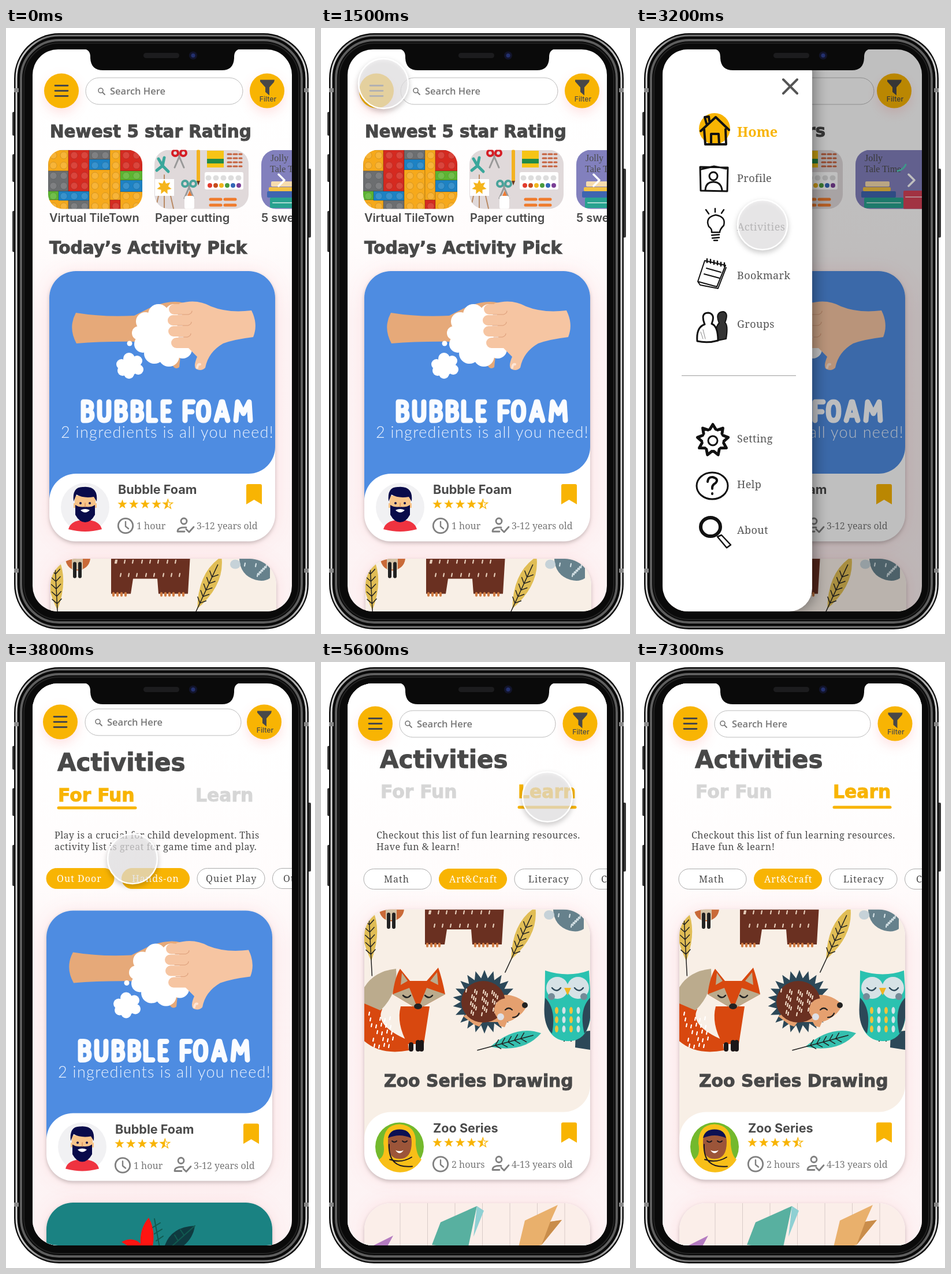
Write an HTML page that moves like this. It is 535 px wide and 1047 px high and loops after 7400 ms.

```html
<!DOCTYPE html>
<html lang="en">
<head>
<meta charset="utf-8">
<title>Activity app</title>
<style>
html,body{margin:0;width:100%;height:100%;overflow:hidden;background:#fff}
svg{display:block;width:100vw;height:100vh}
text{fill:#4a4a4a}
.h{font:bold 29.4px "DejaVu Sans",sans-serif;stroke:currentColor;stroke-width:1;color:#484848;fill:currentColor}
.s{font:16px "Noto Serif",serif}
.u{font:600 20px Inter,sans-serif}
.o{font:600 16.5px "Open Sans",sans-serif;fill:#777}
.l{fill:none;stroke-linecap:round;stroke-linejoin:round}
.k{stroke:#111;stroke-width:3}
.card{filter:drop-shadow(0 3px 3px #0003) drop-shadow(0 0 16px #ff304018)}
.btn{filter:drop-shadow(0 8px 10px #ff303024)}
</style>
</head>
<body>
<svg id="stage" viewBox="0 0 535 1047" preserveAspectRatio="none"></svg>
<script>
const GOLD = '#f8b403', NAVY = '#2c4858', HOLE = '#0000';
const path = (d, fill, more = '') => `<path d="${d}" fill="${fill}" ${more}/>`;
const line = (d, color, w, more = '') => `<path d="${d}" class="l" stroke="${color}" stroke-width="${w}" ${more}/>`;
const ink = (d, w = 3, fill = 'none') => `<path d="${d}" fill="${fill}" stroke="#111" stroke-width="${w}" stroke-linecap="round" stroke-linejoin="round"/>`;
const dot = (x, y, r, fill, more = '') => `<circle cx="${x}" cy="${y}" r="${r}" fill="${fill}" ${more}/>`;
const oval = (x, y, rx, ry, fill, more = '') => `<ellipse cx="${x}" cy="${y}" rx="${rx}" ry="${ry}" fill="${fill}" ${more}/>`;
const box = (x, y, w, h, fill, r = 0, more = '') => `<rect x="${x}" y="${y}" width="${w}" height="${h}" rx="${r}" fill="${fill}" ${more}/>`;
const text = (x, y, cls, str, style = '') => `<text x="${x}" y="${y}" class="${cls}" style="${style}">${str}</text>`;
const move = (x, y, body) => `<g transform="translate(${x} ${y})">${body}</g>`;
const list = (n, f) => Array.from({length: n}, (_, i) => f(i)).join('');
const dots = (fill, ...pts) => pts.map(p => dot(...p, fill)).join('');

function spikes(x, y, r, inner, n) {
  return 'M' + Array.from({length: 2 * n}, (_, i) => {
    const a = Math.PI * (i / n - .5), q = i % 2 ? inner : r;
    return (x + q * Math.cos(a)).toFixed(1) + ' ' + (y + q * Math.sin(a)).toFixed(1);
  }).join('L') + 'Z';
}

function header(mx, my, sx, sy, sw, tx, fx, fy) {
  return dot(mx, my, 30, GOLD, 'class="btn"') +
    line(`M${mx - 11} ${my - 9}h22m-22 9h22m-22 9h22`, '#484848', 2.8) +
    box(sx, sy, sw, 46, '#fff', 23, 'stroke="#bbb"') +
    dot(tx - 16, sy + 22, 4, 'none', 'stroke="#777" stroke-width="1.6"') +
    line(`M${tx - 13} ${sy + 25}l4 4`, '#777', 1.8) + text(tx, sy + 29, 'o', 'Search Here') +
    dot(fx, fy, 30, GOLD, 'class="btn"') +
    path(`M${fx - 12} ${fy - 19}h25l-1 4-8 9v14l-7-6v-8l-9-10Z`, '#484848') +
    text(fx + 1.5, fy + 18, 'u', 'Filter', 'font-size:12.2px;font-weight:500;text-anchor:middle');
}

const PIC = 'M75 816V466A46 46 0 0 1 121 420H420A46 46 0 0 1 466 466V724A46 46 0 0 1 420 770H121A46 46 0 0 0 75 816Z';

function card(x, y, color, art, title = '', time = '', age = '', face = '') {
  const star = i => spikes(201.5 + i * 19.7, 823, 8.6, 3.5, 5);
  return move(x, y, box(75, 420, 391, 467, '#fff', 46, 'class="card"') + path(PIC, color) +
    `<g clip-path="url(#pic)">${art}</g>` + face + text(194, 805, 'u', title, 'font-size:21.6px;font-weight:700') +
    list(4, i => path(star(i), GOLD)) + path(star(4), 'none', `stroke="${GOLD}" stroke-width="1.3"`) +
    `<g clip-path="url(#half)">${path(star(4), GOLD)}</g>` +
    path('M416 791q0-3 3-3h21q3 0 3 3v32l-13.5-8-13.5 8Z', GOLD) +
    dot(207, 860, 12.7, 'none', 'stroke="#808080" stroke-width="2.8"') + line('M207 853v8l5 4', '#808080', 2.4) +
    dot(308, 852, 5, 'none', 'stroke="#808080" stroke-width="2.8"') +
    line('M312 863Q297 862 297 870H309M312 866l5 5 8-9', '#808080', 2.8) +
    text(226, 866, 's', time, 'fill:#777') + text(330, 866, 's', age, 'fill:#777'));
}

// Hands, foam and hand lettering
const B = 'v32h5q10 0 10-9 0-8-9-8 8 0 8-8 0-7-9-7Z';
const foamArt =
  path('M121 492Q170 500 222 497L252 482Q285 469 308 475V510L300 586Q292 592 287 580L230 542Q170 541 122 545 107 518 121 492Z', '#e6a979') +
  dots('#fff', [278, 532, 41], [264, 495, 18], [291, 493, 16], [241, 507, 16], [230, 527, 12], [237, 546, 15], [257, 562, 18],
    [282, 567, 18], [306, 555, 16], [214, 545, 4.5], [215, 584, 16], [213, 571, 10], [227, 575, 9], [229, 590, 9], [213, 597, 9], [202, 592, 9], [200, 581, 9]) +
  line('M291 486H330M289 505H330M290 524H330M295 544H330', '#f6c5a2', 18) +
  path('M300 476Q330 467 355 481 385 493 425 488 437 512 428 534 395 538 376 545 350 560 345 587 338 594 329 589 324 584 331 568L316 553Q304 545 306 500Z', '#f6c5a2') +
  line('M298 495h18q6-2 6-6M297 514h18q6-2 6-6M299 534h15q6-2 6-6', '#dda07c', 1.2) +
  line('M331 587q1-7 5-6', '#fde5d6', 4) +
  line(`M134 646${B}M162 646v21q0 11 8 11 8 0 8-11v-21M192 646${B}M220 646${B}M247 646v32h12M283 646h-11v32h11m-11-16h9M324 646h-14v32m0-15h12M342 646q-9 0-9 16t9 16q9 0 9-16t-9-16M364 678l9-32h2l9 32m-17-9h14M398 678l3-32 10 20 10-20 2 32`, '#fafcff', 9) +
  text(95, 708, '', '2 ingredients is all you need!', 'font:300 27px Lato,sans-serif;letter-spacing:1.3px;fill:#eef5ff');

const leaf = (x, y, len, turn, fill) => `<g transform="translate(${x} ${y}) rotate(${turn})">` +
  path(`M0 ${-len}Q26 ${-len / 3} 0 ${len * .6}Q-26 ${-len / 3} 0 ${-len}Z`, fill) +
  line(`M0 ${-len * .75}V${len}` + list(5, i => `M-8 ${-len * .5 + i * len * .2}l8 8 8-8`), '#222', 1.5) + '</g>';
const flecks = (n, x, y, w, h, color) => line(list(n, i => `M${x + i * 37 % w} ${y + i * 23 % h}l-1 5`), color, 2.2);

const bear = path('M180 420H317L313 488H262L260 462H218L214 488H180Z', '#6a3021') +
  line('M184 487v4m7-4v4m7-4v4m7-4v4M267 487v4m7-4v4m7-4v4m7-4v4m10-4v4m7-4v4', '#cf7a42', 4) + flecks(17, 188, 430, 118, 46, '#e5ccb8');
const fox =
  path('M75 580Q95 590 106 600 92 628 150 653L152 671Q104 680 75 655Z', '#d8480f') +
  path('M75 562Q92 534 130 530 134 572 103 602L75 590Z', '#bbab8d') +
  path('M138 595H188L178 660H150Q130 625 138 595Z', '#d8480f') +
  line('M156 661v8m12-12v12m6-12v12', '#1c1718', 8) + flecks(22, 84, 605, 42, 58, '#fff') +
  path('M137 530L154 551H183L203 528Q210 548 215 574L168 600 124 574Q128 544 137 530Z', '#d8480f') +
  path('M124 574L153 563 168 600ZM215 574L183 563 168 600ZM140 537l10 14-12 7ZM201 536l-12 15 14 7Z', '#bbab8d') +
  oval(168, 595, 7, 5, '#222') + line('M142 576q7 7 13 0m25 0q7 7 13 0', '#222', 2.5);
const hedgehog =
  path(spikes(283, 587, 55, 41, 22), NAVY) +
  path('M318 575Q340 575 357 592 350 612 322 622L318 631 310 629 306 622H280L274 630 266 627 246 612Z', '#e5a06f') +
  oval(281, 587, 38, 36, '#6a3021') + flecks(34, 252, 565, 56, 42, '#efd9c5') +
  oval(321, 601, 21, 20, '#e5a06f') + dot(353, 593, 5, '#222') + dot(311, 613, 6, '#dfe0e6') +
  line('M319 601q6-6 12 0m1 13q8 0 11-7', '#222', 2.2);
const owl =
  line('M421 645v10m12-10v10', '#222', 2) + path('M441 640L466 637V670L440 666Z', NAVY) +
  path('M388 533Q428 546 464 533L468 600Q466 656 427 655 388 654 387 600Z', '#2bc2b0') +
  path('M388 580Q408 600 400 642 382 625 388 580ZM466 580Q446 600 456 642 470 625 466 580Z', NAVY) +
  dots('#d6e2e6', [409, 563, 19], [445, 563, 19]) + dots('#748b98', [399, 578, 6], [455, 578, 6]) +
  path('M421 563h12l-6 13Z', '#f0b422') + line('M400 563q8 9 15 0m24 0q8 9 15 0', NAVY, 2.5) +
  list(12, i => oval(408 + i % 4 * 12.5, 602 + (i >> 2) * 16, 3, 6, ['#f0c33c', '#d6e2e6'][i % 2]));
const zooArt = move(0, -7.5,
  path('M100 420H144Q146 444 122 448 100 446 100 420Z', '#c96a38') + path('M112 420h19v26h-19Z', '#d3c2a6') + line('M117 436v22m9-22v22', '#222', 6) +
  bear + leaf(85, 478, 64, -3, '#e0bd55') + leaf(345, 480, 62, 25, '#e0bd55') + leaf(326, 656, 57, 75, '#35bfae') +
  path('M402 420H455V461Q445 468 430 464 400 455 402 420Z', '#66818c') + oval(395, 437, 9, 8, '#c6d2d8') + flecks(8, 412, 435, 40, 20, '#d6e2e6') +
  fox + hedgehog + owl + text(109, 734, 'h', 'Zoo Series Drawing', 'font-size:29.8px'));

const beardFace = dot(137, 828, 42, '#f1f1f3') +
  path('M108 866Q112 850 137 850T166 866Q150 870 137 870T108 866Z', '#ef3340') +
  path('M119 808h36v13h2v8h-4l-3 18h-26l-3-18h-4v-8h2Z', '#f8c489') +
  path('M117 818Q114 792 134 793 160 791 157 818L152 810Q134 813 122 806ZM120 824q7 5 17 3 10 2 17-3v17q-7 13-17 13t-17-13Z', '#090b4a') +
  dots('#090b4a', [129, 821, 2], [145, 821, 2]) + path('M129 833q8-4 16 0-8 8-16 0Z', '#fff') + line('M137 821v6', '#e19c66', 2);
const scarfFace = dot(136, 830, 42, '#73b92d') +
  path('M100 852Q112 846 108 824 108 792 136 791 166 793 164 826 166 846 174 852A42 42 0 0 1 100 852Z', '#f8bf18') +
  path('M116 822Q115 803 136 802T157 822Q157 851 136 851T116 822Z', '#9c5539') + path('M116 815Q119 800 136 800T156 815Q136 806 116 815Z', '#0c1053') +
  line('M123 820q4 4 8 0m10 0q4 4 8 0M118 826Q116 868 158 864M119 852q20 7 38-4', '#1c1720', 2) + path('M129 836q7 3 14 0-7 10-14 0Z', '#fff');

const bubbleCard = (x, y) => card(x, y, '#4e8ce1', foamArt, 'Bubble Foam', '1 hour', '3-12 years old', beardFace);
const zooCard = (x, y) => card(x, y, '#f8efe6', zooArt, 'Zoo Series', '2 hours', '4-13 years old', scarfFace);
const flowerArt = path('M240 505Q232 470 252 446 266 470 257 505ZM205 488Q230 475 245 500L240 510Z', '#ff1512') +
  path('M277 505Q285 462 332 460 328 490 295 505Z', '#0f3a40') + line('M262 448l9 50m-12-35l13-8m-10 19l13-8m-10 20l12-8M332 460L287 500m20-33l6 9m-16 0l6 10', '#115a50', 2);
const paperArt = line(list(8, i => `M${137 + i * 47.5} 420V500`), '#d9cbc8', 1) +
  path('M192 492L207 453 270 425 254 500Z', '#58b0a0') + path('M270 425l12 8-18 45Z', '#8fd0d3') +
  path('M341 500L353 450 410 423 397 452 417 449 382 492Z', '#e9b06c') + path('M397 452l20-3-35 43Z', '#c98d4b') +
  path('M87 495L125 476 112 500Z', '#b47bc0');

// Thumbnails
const bricks = [[73, 211, 35, 36, 0], [73, 247, 35, 35, 3], [73, 282, 18, 15, 4], [73, 297, 35, 16, 0], [91, 282, 53, 16, 2], [108, 211, 36, 71, 1], [108, 298, 36, 15, 3],
  [144, 211, 36, 16, 3], [144, 227, 36, 18, 2], [144, 245, 36, 68, 0], [180, 211, 18, 88, 0], [180, 297, 18, 16, 1], [198, 211, 38, 36, 1], [198, 247, 38, 16, 4], [198, 263, 38, 20, 2], [198, 283, 38, 30, 0]];
const tints = ['#f6a91b', '#d52a20', '#1d82c4', '#6c6e70', '#5cb531'];
const blockThumb = bricks.map(([x, y, w, h, c]) => box(x, y, w, h, tints[c], 0, 'stroke="#0003"')).join('') +
  list(54, i => dot(82 + i % 9 * 18, 220 + (i / 9 | 0) * 17.6, 6, '#ffffff20', 'stroke="#0002"'));
const snips = (x, y, c) => line(`M${x - 8} ${y + 16}l12-28m4 28l-12-28`, '#999', 3) +
  dot(x - 7, y - 9, 5, 'none', `stroke="${c}" stroke-width="4"`) + dot(x + 7, y - 9, 5, 'none', `stroke="${c}" stroke-width="4"`);
const craftThumb = box(257, 211, 163, 102, '#e0d9da') +
  line('M261 246l10-8 10 10m-10-10l-7-12m7 12l3-14', '#3aa79b', 5) + snips(300, 225, '#d51d24') + snips(317, 278, '#49a39a') +
  line('M333 213v50', '#f3b220', 6) + path('M330 264h6l-3 8Z', '#6a3a20') +
  box(348, 212, 29, 29, '#f6c416') + box(348, 226, 29, 8, '#218b48') + line('M384 218h24m-24 7h24m-24 7h24m-24 7h24', '#c6613c', 3, 'stroke-dasharray="6 4"') +
  line('M264 290l-5 22m26-22l5 22m-16-58v58', '#b98a64', 2) + box(258, 261, 33, 29, '#fff') + path(spikes(274, 275, 13, 7, 7), '#f5b51c') +
  box(344, 249, 67, 30, '#fff', 3) + line('M350 259h55', '#ddd', 9, 'stroke-dasharray="1 12"') +
  list(6, i => dot(353 + i * 10, 272, 4, ['#e23b2e', '#c74c1d', '#f0b51e', '#4a9b3e', '#3467b7', '#7b3f96'][i])) +
  box(309, 290, 17, 23, '#fff', 4) + path('M314 290l4-9 4 9Z', '#ec7b35') +
  line('M354 296h18m7 0h18M354 306h18m7 0h18', '#ef7b2d', 5);
const bookThumb = box(442, 211, 163, 102, '#8280bd') +
  text(458, 230, '', 'Jolly', 'font:italic bold 11px "DejaVu Sans",sans-serif;fill:#171a4c') +
  text(457, 249, '', 'Tale Time', 'font:italic 15px "DejaVu Sans",sans-serif;fill:#fff') +
  line('M515 247q10-2 14-11', '#52cbb6', 3) + box(459, 265, 42, 9, '#f6dcae', 2) + box(455, 275, 48, 7, '#f3c244', 2) +
  box(452, 282, 60, 11, '#3e65b0', 2) + box(457, 293, 68, 18, '#28a28f', 2) + box(525, 281, 60, 32, '#d64258', 2) + line('M462 302h58m9-10h50', '#fff9', 2);
const thumb = (x, y, art) => `<g clip-path="url(#t${x})">${art}</g>`;
const slot = x => `<clipPath id="t${x}">${box(x, 210.5, 163, 102, '#000', 25)}</clipPath>`;

function drawer() {
  const item = (y, s) => text(175, y, 's', s, 'font-size:18px;letter-spacing:.4px;fill:#555');
  return box(0, 37, 305, 971, '#fff', 40, 'style="filter:drop-shadow(4px 0 12px #0006)"') +
    line('M255 89l24 24m0-24l-24 24', '#555', 4) +
    dot(136, 174, 27, GOLD) + ink('M112 178l26-24 23 22M118 175l2 26h36l-1-26M130 201v-18h13l1 18M122 165l-3-11 7-1 1 8', 4) +
    text(175, 188, 's', 'Home', `font-size:23.5px;font-weight:bold;fill:${GOLD}`) +
    ink('M111 240l48 1-1 41-46-1ZM120 280q1-14 14-14t15 14M127 256a7 7 0 1 1 14 0 7 7 0 0 1-14 0M113 244l22-5 21 4', 3) + item(266, 'Profile') +
    ink('M131 353q1-6-5-10-7-16 12-20 18 3 14 18-7 7-7 12ZM131 358l13-1m-12 6l12-1m-9 5h6M121 314l5 7m11-9v6m15-4l-4 6', 2.5) + item(350, 'Activities') +
    ink('M119 402l36 8-15 37-33-9ZM107 438l4 6 31 6 14-36M122 415l25 7m-29 3l26 7', 2) + line('M123 405v-6m6 7v-6m6 8v-6m6 7v-6m6 8v-6m6 7v-6', '#111', 2.5) + item(434, 'Bookmark') +
    ink('M136 541q2-28 8-31-8-19 7-20 10 2 3 19 6 4 2 28Z', 2, '#333') + ink('M106 541q-2-24 13-29-8-20 6-20 13 2 6 19 11 4 11 29-18 5-36 1Z', 3, '#fff') +
    line('M112 525l4 12m0-16l4 16', '#888', 1) + item(518, 'Groups') +
    box(79, 600, 198, 1.2, '#aaa') +
    ink(spikes(133, 712, 27, 18, 9), 5, '#fff') + dot(133, 712, 17, '#fff') + dot(133, 713, 8, 'none', 'class="k"') + item(716, 'Setting') +
    oval(132, 791, 27, 23, 'none', 'class="k"') + ink('M124 784q1-9 9-8 11 3 5 10-7 4-6 10m0 8v1', 4) + item(795, 'Help') +
    oval(129, 862, 17, 16, '#fff', 'stroke="#111" stroke-width="6"') + ink('M141 879l16 19 7-5-16-17Z', 2.5) + item(874, 'About');
}

const bg = box(46, 37, 449, 971, 'url(#bg)');
const label = (x, s) => text(x, 335, 'u', s);
const chip = (x, y, tx, s, on) => box(x, y, 117, 35, on ? GOLD : '#fff', 17.5, `stroke="${on ? GOLD : '#aaa'}"`) +
  text(tx, y + 23, 's', s, `letter-spacing:1.05px;fill:${on ? '#fff' : '#4a4a4a'}`);
const tab = (x, y, s, on) => text(x, y, 'h', s, `font-size:31.4px;color:${on ? GOLD : '#d6d6d6'}`);
const para = (x, y, s) => text(x, y, 's', s, 'letter-spacing:.5px');

const home = bg + '<g id="top"></g>' +
  `<g id="extra">${text(76, 189, 'h', 'Newest 5 star Rating')}${text(75, 390, 'h', 'Today’s Activity Pick', 'font-size:29.6px')}` +
  label(75, 'Virtual TileTown') + label(258, 'Paper cutting') + label(442, '5 sweet books') + '</g>' +
  text(328, 188, 'h', 'Top Starters', 'text-anchor:end" id="alt') +
  `<g id="row">${thumb(73, 0, blockThumb) + thumb(257, 0, craftThumb) + thumb(442, 0, bookThumb)}</g>` +
  line('M472 253l10 10-10 10', '#fff', 3.5) + bubbleCard(0, 0) + zooCard(2, 497) +
  box(46, 37, 449, 971, '#000', 0, 'id="dim"') + `<g id="drawer">${drawer()}</g>`;

const fun = bg + header(94, 103.5, 137, 81, 270, 175, 447, 103.5) + text(89, 188, 'h', 'Activities', 'font-size:42px') +
  tab(90, 241, 'For Fun', true) + tab(328, 241, 'Learn') + line('M91 252H224', GOLD, 5) +
  para(84, 305, 'Play is a crucial for child development. This') + para(84, 325, 'activity list is great for game time and play.') +
  chip(70, 356.5, 88, 'Out Door', true) + chip(200.5, 356.5, 218, 'Hands-on', true) + chip(331, 356.5, 346, 'Quiet Play') + chip(461.5, 356.5, 480, 'Other Play') +
  bubbleCard(-5, 9.5) + card(-5, 514, '#1a8282', flowerArt);

const learn = bg + header(94, 106.5, 136, 84, 270, 166, 448.5, 106.5) + text(102, 183, 'h', 'Activities', 'font-size:42px') +
  tab(103, 235, 'For Fun') + tab(341, 235, 'Learn', true) + line('M343 251H440', GOLD, 5) +
  para(96, 305, 'Checkout this list of fun learning resources.') + para(96, 325, 'Have fun &amp; learn!') +
  chip(74, 357.5, 109, 'Math') + chip(204.5, 357.5, 222, 'Art&amp;Craft', true) + chip(335, 357.5, 359, 'Literacy') + chip(465.5, 357.5, 485, 'Coding') +
  zooCard(0, 7.5) + card(0, 515, '#fbeee9', paperArt);

const ring = (i, stroke, w, r) => box(14 + i, 9 + i, 510 - 2 * i, 1030 - 2 * i, 'none', r, `stroke="${stroke}" stroke-width="${w}"`);
const phone = box(11, 145, 6, 41, '#333', 2) + box(11, 218, 6, 48, '#333', 2) + box(11, 316, 6, 71, '#333', 2) + box(521, 243, 7, 119, '#333', 2) +
  box(14, 9, 510, 1030, '#0a0a0a', 78) + ring(4, 'url(#metal)', 3, 74) + ring(12, '#5e5e5e', 4, 66) + ring(17, '#222', 2, 61) +
  [104, 934].map(y => box(14, y, 8, 7, '#888') + box(516, y, 8, 7, '#888')).join('');
const notch = path('M134 36Q146 37 146 50V52Q147 73 168 73H374Q394 73 395 52V50Q395 37 407 36Z', '#0a0a0a') +
  box(238, 43, 62, 9, '#1c1c1e', 4.5) + dot(324, 47.5, 7, '#12142b') + dot(324, 47.5, 3.5, '#23306e');

stage.innerHTML = `<defs>
<linearGradient id="bg" x2="0" y2="1"><stop offset=".1" stop-color="#fff"/><stop offset=".35" stop-color="#fffcfc"/><stop offset=".48" stop-color="#fdf4f5"/><stop offset="1" stop-color="#fdf3f4"/></linearGradient>
<linearGradient id="metal"><stop stop-color="#d8d8d8"/><stop offset=".1" stop-color="#777"/><stop offset=".9" stop-color="#777"/><stop offset="1" stop-color="#d8d8d8"/></linearGradient>
<clipPath id="screen">${box(46, 37, 449, 971, '#000', 44)}</clipPath><clipPath id="pic"><path d="${PIC}"/></clipPath>
<clipPath id="half">${box(268, 810, 12.3, 25, '#000')}</clipPath>${slot(73) + slot(257) + slot(442)}</defs>
${phone}<g clip-path="url(#screen)"><g>${home}</g><g id="fun">${fun}</g><g id="learn">${learn}</g></g>${notch}
<g id="touch"><circle r="43" stroke="#fff" stroke-width="2.5" style="filter:drop-shadow(0 4px 4px #0004)"/></g>`;

const el = id => document.getElementById(id);
const ease = (t, a, b) => {
  const p = Math.min(1, Math.max(0, (t - a) / (b - a)));
  return p * p * (3 - 2 * p);
};
const fade = (id, p) => {
  el(id).style.opacity = p;
  el(id).style.display = p ? '' : 'none';
};
// start, end, x, y of each finger move
const stops = [[1000, 1300, 108, 96], [2500, 3000, 219, 340], [4100, 4700, 392, 233], [5700, 6200, 484, 244], [6500, 7200, -50, 90]];
const headers = [header(96, 108.5, 138, 86, 272, 180, 452, 108.5), header(91, 108.5, 138, 86, 274, 180, 447, 108.5)];
let shown = -1;

function draw(now) {
  const t = now % 7400, open = ease(t, 1700, 2050), under = open > .5 ? 1 : 0;
  if (under !== shown) el('top').innerHTML = headers[shown = under];
  fade('extra', 1 - open);
  fade('alt', open);
  el('row').setAttribute('transform', `translate(${-62 * open} 0)`);
  fade('dim', .25 * open);
  fade('drawer', open ? 1 : 0);
  el('drawer').setAttribute('transform', `translate(${-300 * (1 - open)} 0)`);
  fade('fun', ease(t, 3400, 3700));
  fade('learn', ease(t, 5200, 5500));
  let x = 108, y = 87;
  for (const [a, b, tx, ty] of stops) {
    const p = ease(t, a, b);
    x += (tx - x) * p;
    y += (ty - y) * p;
  }
  fade('touch', ease(t, 1000, 1300));
  el('touch').setAttribute('transform', `translate(${x} ${y})`);
  el('touch').firstChild.setAttribute('fill', `rgba(240,239,240,${.66 + .28 * ease(t, 5700, 6200)})`);
}
(function tick() {
  draw(performance.now());
  requestAnimationFrame(tick);
})();
</script>
</body>
</html>
```
